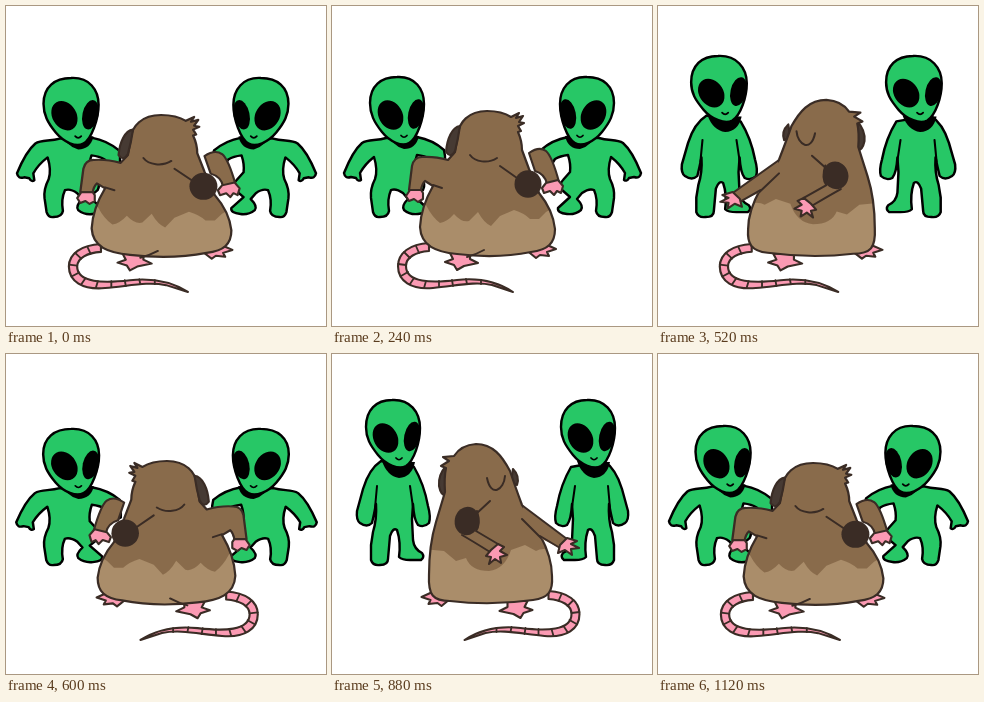
An HTML page for the animation above (1.16 s loop, 320 px wide and 320 px high).

```html
<!DOCTYPE html>
<html lang="en">
<head>
<meta charset="utf-8">
<title>Dancing rat and aliens</title>
<style>
html, body { margin: 0; width: 100%; height: 100%; overflow: hidden; background: #fff; }
svg { display: block; width: 100%; height: 100%; }
path { stroke-linejoin: round; stroke-linecap: round; }
</style>
</head>
<body>
<svg id="stage" viewBox="0 0 320 320"></svg>
<script>
const INK = '#3a2c25', FUR = '#896b4b', BELLY = '#aa8d6a';
const EAR = '#463a33', PINK = '#fb9ab3', GREEN = '#27c766';

const shape = (d, fill, stroke, width) =>
  `<path d="${d}" fill="${fill}" stroke="${stroke}" stroke-width="${width}"/>`;
const fur = (d, fill = FUR) => shape(d, fill, INK, 2.1);
const line = (d, width = 2) => shape(d, 'none', INK, width);
const skin = d => shape(d, GREEN, '#000', 2.4);
const black = d => `<path d="${d}"/>`;
const oval = (x, y, rx, ry, turn, fill = '#000') =>
  `<ellipse cx="${x}" cy="${y}" rx="${rx}" ry="${ry}" transform="rotate(${turn} ${x} ${y})" fill="${fill}"/>`;
const smile = d => shape(d, 'none', '#000', 1.7);

const alienLow = {
  body: skin('M54 132C44 135 36 133 30 137C23 143 16 157 12 167Q13 173 19 171L24 172Q26 176 29 174L28 167Q33 158 42 151Q46 164 43 173Q38 183 39 192L41 206Q43 212 48 211Q56 211 57 205Q55 193 59 184Q64 182 71 187L76 193Q69 200 72 204Q78 209 86 208Q96 207 95 202L83 191L91 184Q94 178 90 174L83 166Q82 158 85 149Q93 150 98 153L106 166L113 162V150L112 144Q101 134 85 131Z'),
  head: black('M54 125Q60 140 72 143Q84 143 87 130Z') +
    skin('M65 71C83 70 92 83 92 98C92 112 85 133 77 137C70 141 58 136 50 126C42 116 38 108 38 97C38 80 49 71 65 71Z') +
    oval(58.5, 109, 11.8, 15.6, -30) + oval(84, 108, 7.8, 15, 12) +
    smile('M69 129.5Q72 133 75 129.5')
};
const alienHigh = {
  body: skin('M49 107Q37 115 31 135L25 157Q24 166 28 169Q35 174 40 169L42 160L44 150Q45 165 41 178L39 191V206Q41 212 48 211Q56 211 56 205L58 182Q61 173 65 176Q69 188 67 203Q70 206 78 206H89Q93 203 90 199Q82 195 81 186L80 165L81 150Q82 166 86 171Q92 174 97 169Q99 163 96 152Q92 130 82 113Z') +
    shape('M45 132L43 154M78 132L81 153', 'none', '#000', 2),
  head: black('M50 107Q55 122 67 124Q80 123 83 108Z') +
    skin('M60 46C78 45 88 58 88 74C88 88 82 107 74 112C67 116 54 111 46 101C38 91 34 84 34 73C34 56 44 46 60 46Z') +
    oval(53.5, 84, 11.8, 15.6, -30) + oval(80, 82.5, 7.8, 15, 12) +
    smile('M64 104Q67 107.5 70 104')
};

const tail = fur('M97 237C78 238 66 247 66 260C66 275 79 284 101 282C124 280 142 275 160 279L181 286C163 274 143 272 125 274C100 277 74 277 74 260C74 251 84 246 97 245Z', PINK) +
  line('M84 240L87 247M72 246L78 252M66 258L74 259M69 270L76 266M78 278L82 272M92 282L94 275M107 281L107 275M121 280L120 274M135 278L134 273M149 278L149 274', 1.8);
const feet = fur('M118 247L121 253L113 256L122 259L125 264L132 260L146 257L138 253V247Z', PINK) +
  fur('M193 243L204 252L208 249L217 250L215 246L224 243L213 238Z', PINK);

function torso(id, outline, edge) {
  return `<clipPath id="${id}"><path d="${outline}"/></clipPath><path d="${outline}" fill="${FUR}"/>` +
    `<path d="${edge}V255H80Z" fill="${BELLY}" clip-path="url(#${id})"/>` + line(outline, 2.2);
}

const ratLow = tail + feet +
  fur('M197 147Q207 140 214 145Q220 150 227 176L215 178Q213 168 203 165Z') +
  fur('M226 174L231 180L229 187L225 185L222 189L218 185L212 187L210 182L214 177Z', PINK) +
  torso('low',
    'M116 154Q102 150 90 151Q82 151 80 160L77 184H89Q90 178 93 175L101 180Q89 201 88 221C89 240 104 246 125 248Q165 253 199 246C216 244 223 237 223 223Q221 204 207 187L197 163L190 144Q190 135 186 126L189 125L186 120L192 117L187 116L191 110L184 112L187 107L179 111Q170 105 155 105C136 105 127 117 126 128L123 146Z',
    'M80 194L94 199Q100 211 108 217Q115 216 122 208Q130 217 137 215L146 206Q152 217 159 220L168 210L182 204Q192 207 198 213L207 213L214 206L226 199') +
  fur('M128 120C120 121 115 133 114 146Q119 153 123 145Q126 134 128 120Z', EAR) +
  fur('M78 184L74 190L77 195L82 193L86 196L91 193V187L89 184Z', PINK) +
  line('M101 179L110 182M138 149C143 156 156 158 165 152M168 160L185 172M135 251Q143 249 152 244') +
  oval(196, 178, 13.5, 13.8, 0, INK);

const ratHigh = `<g transform="translate(-1.5 0)">${tail}${feet}</g>` +
  fur('M131 115Q124 122 127 131L133 128Z', EAR) +
  fur('M198 112Q206 121 205 132Q203 142 198 141Z', EAR) +
  torso('high',
    'M104 181L122 151Q129 132 134 117C142 102 151 90 168 90Q183 91 190 102L201 103L195 107L203 112L198 114Q200 123 199 138L208 168Q215 191 215 221C216 241 211 247 194 247Q154 252 111 246C95 244 91 237 92 222C92 207 97 194 104 181Z',
    'M80 202Q99 191 108 197L119 191L133 196Q139 215 155 217Q173 217 178 204L188 207L200 197L220 195') +
  `<path d="M121 152L77 185L84 194L106 183L123 165Z" fill="${FUR}"/>` +
  line('M121 152L77 185L84 194L104 182M122 165L103 184') +
  fur('M77 184L67 187L73 190L65 194L73 195L72 201L79 196L86 199L84 191Z', PINK) +
  `<path d="M167 175L146 190L153 198L181 182Z" fill="${FUR}"/>` +
  line('M167 157Q163 170 168 177L146 190M182 181Q170 188 154 198') +
  fur('M146 190L140 193L144 197L137 201L144 203L143 209L149 205L155 210L153 203L158 202L153 196Z', PINK) +
  line('M139 122C140 136 153 144 157 124M154 147L168 160') +
  oval(177, 167, 12.3, 14.2, -12, INK);

const mirror = sum => `matrix(-1 0 0 1 ${sum} 0)`;
const part = (name, content) => `<g class="${name}">${content}</g>`;
const moved = (transform, content) => `<g transform="${transform}">${content}</g>`;

// Crouching aliens face each other; standing ones look the same way.
const poses = [
  { alien: alienLow, headMove: mirror(320), rat: ratLow, flip: 316 },
  { alien: alienHigh, headMove: 'translate(195 0)', rat: ratHigh, flip: 312 }
];
const stage = document.getElementById('stage');
stage.innerHTML = poses.map(({ alien, headMove, rat }) => part('pose',
  part('left', alien.body + alien.head) +
  part('right', moved(mirror(321), alien.body) + moved(headMove, alien.head)) +
  part('rat', rat))).join('');
const views = [...stage.querySelectorAll('.pose')].map(root => ({
  root,
  left: root.querySelector('.left'),
  right: root.querySelector('.right'),
  rat: root.querySelector('.rat')
}));

// start, pose, rat stretch x and y, alien stretch x and y
const beat = [
  [0, 0, 1.035, 0.978, 1.02, 0.993],
  [40, 0, 1.02, 0.989, 1.035, 0.972],
  [240, 0, 1, 1, 1, 1],
  [280, 1, 0.98, 1.015, 1.02, 0.98],
  [320, 1, 1, 1, 1, 1],
  [520, 1, 1.03, 0.98, 1.03, 0.976]
];
const HALF = 560, LOOP = 1160;

const stretch = (x, y, sx, sy) => `translate(${x} ${y}) scale(${sx} ${sy}) translate(${-x} ${-y})`;

function draw(now) {
  const t = now % LOOP;
  const turned = Math.floor(t / HALF) === 1;
  const [, pose, rx, ry, ax, ay] = beat.findLast(step => step[0] <= t % HALF);
  views.forEach((v, i) => v.root.setAttribute('display', i === pose ? 'inline' : 'none'));
  const { left, right, rat } = views[pose];
  const flip = turned ? mirror(poses[pose].flip) : '';
  rat.setAttribute('transform', `${flip} ${stretch(155, 285, rx, ry)}`);
  left.setAttribute('transform', stretch(62, 212, ax, ay));
  right.setAttribute('transform', stretch(259, 212, ax, ay));
}

let origin;
function tick(now) {
  origin ??= now;
  draw(now - origin);
  requestAnimationFrame(tick);
}
draw(0);
requestAnimationFrame(tick);
</script>
</body>
</html>
```
